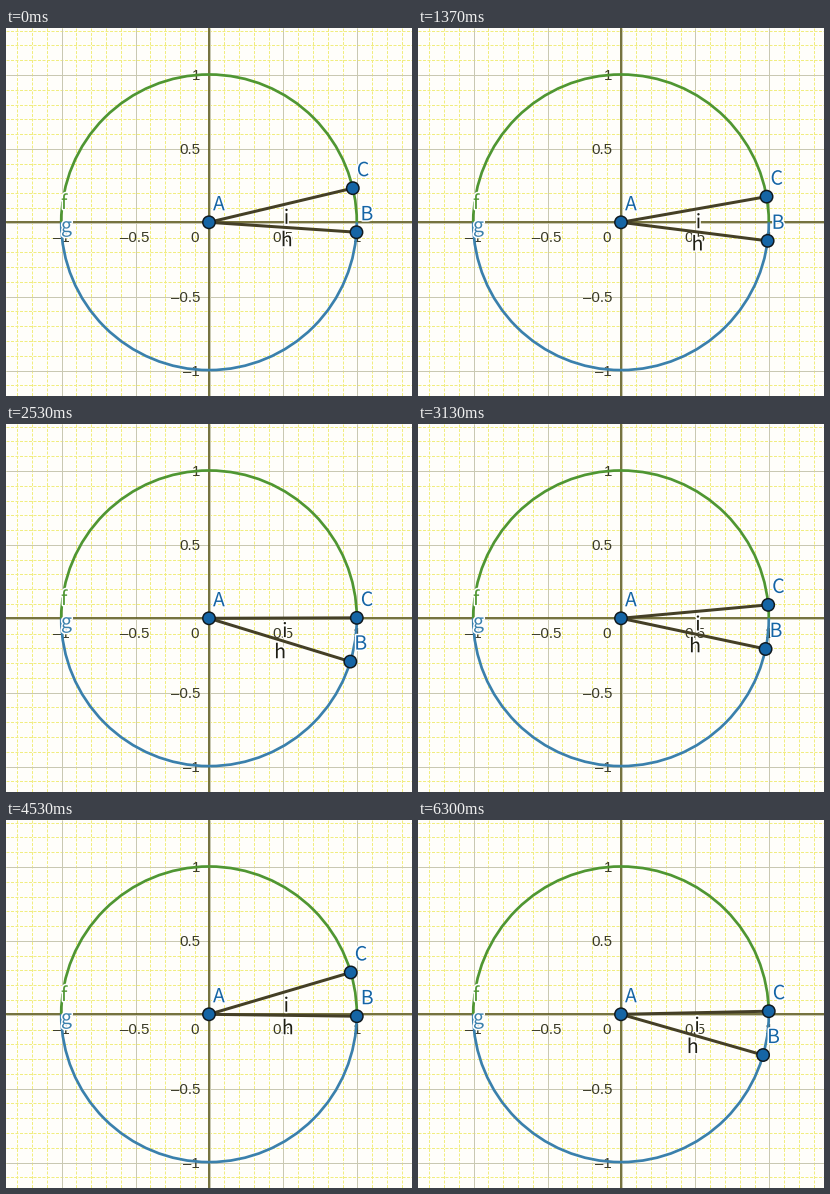
Write a matplotlib script that moves like this. It is 406x368 px and loops after 6.33 s.

```python
import numpy as np
import matplotlib.pyplot as plt
from matplotlib.animation import FuncAnimation
from matplotlib.patches import Arc, Circle
from matplotlib.patheffects import withStroke

W, H, DPI = 406, 368, 64
CX, CY, UNIT = 203, 194.3, 147.8
FRAMES, STEP = 211, 30
PX = 72 / DPI

GREEN, BLUE, DARK = "#4f9632", "#3a80ac", "#443f26"
POINT, AXIS, INK = "#1565a5", "#5f5b20", "#3a3a28"

# The wedge swings between the two ends of a 0.3 rad range.
SPAN = 17.2
TIMES = [0, 510, 800, 1930, 2500, 3130, 3900, 4445, 5170, 6300]
ANGLES = [13.35, SPAN, 14.97, 4.75, 0, 5.3, 12.4, SPAN, 10.8, 1.2]

fig = plt.figure(figsize=(W / DPI, H / DPI), dpi=DPI, facecolor="#fffefa")
ax = fig.add_axes([0, 0, 1, 1])
ax.set(xlim=(0, W), ylim=(H, 0))
ax.axis("off")


def grid(step, color, width, style, z):
    k = np.arange(-20, 21)
    xs = np.floor(CX + k * step * UNIT) + 0.5
    ys = np.floor(CY + k * step * UNIT) + 0.5
    xs, ys = xs[(xs > 0) & (xs < W)], ys[(ys > 0) & (ys < H)]
    opts = dict(colors=color, linewidths=width * PX, linestyles=style, zorder=z)
    ax.vlines(xs, 0, H, **opts)
    ax.hlines(ys, 0, W, **opts)


def tick(x, y, text, ha):
    ax.text(x, y, text, ha=ha, va="center_baseline", color=INK, zorder=3,
            family="Liberation Sans", fontsize=15 * PX)


def label(text, color, x=0, y=0):
    return ax.text(x, y, text, color=color, ha="left", va="baseline", zorder=8,
                   family="Noto Sans CJK JP", fontsize=19.5 * PX,
                   path_effects=[withStroke(linewidth=3 * PX, foreground="white")])


def dot():
    return ax.add_patch(Circle((CX, CY), 6.2, fc=POINT, ec="#10191f",
                               lw=1.5 * PX, zorder=7))


def place(point, name, x, y):
    point.center = x, y
    name.set_position((x + 4, y - 12))


grid(0.1, "#f1ed80", 1, (0, (3, 1.5)), 0)
grid(0.5, "#c9c8b2", 1, "solid", 1)
ax.plot([0, W], [CY, CY], color=AXIS, lw=1.7 * PX, zorder=2)
ax.plot([CX, CX], [0, H], color=AXIS, lw=1.7 * PX, zorder=2)

for v, text in [(1, "1"), (0.5, "0.5"), (-0.5, "–0.5"), (-1, "–1")]:
    tick(194, CY - v * UNIT + 0.5, text, "right")
    tick(CX + v * UNIT, 208.5, text, "center")
tick(189, 208.5, "0", "center")

for start, color in [(180, GREEN), (0, BLUE)]:
    ax.add_patch(Arc((CX, CY), 2 * UNIT, 2 * UNIT, theta1=start,
                     theta2=start + 180, color=color, lw=2.7 * PX, zorder=4))
label("f", GREEN, 55, 181)
label("g", BLUE, 55, 204)

rays = [ax.plot([], [], color=DARK, lw=3 * PX, zorder=6)[0] for _ in "hi"]
ray_names = [label(s, "#1f1f14") for s in "hi"]
ends = [dot() for _ in "BC"]
end_names = [label(s, POINT) for s in "BC"]
place(dot(), label("A", POINT), CX, CY)


def update(n):
    top = np.interp(n * STEP, TIMES, ANGLES)
    for k, deg in enumerate((top - SPAN, top)):
        a = np.radians(deg)
        dx, dy = UNIT * np.cos(a), -UNIT * np.sin(a)
        rays[k].set_data([CX, CX + dx], [CY, CY + dy])
        # Labels hang off the middle of each ray, along its normal.
        ray_names[k].set_position((CX + dx / 2 + 16 * np.sin(a) - 0.8,
                                   CY + dy / 2 + 16 * np.cos(a) + 3))
        place(ends[k], end_names[k], CX + dx, CY + dy)
    return rays + ray_names + ends + end_names


anim = FuncAnimation(fig, update, frames=FRAMES, interval=STEP,
                     repeat=True, repeat_delay=0, blit=False)
plt.show()
```
